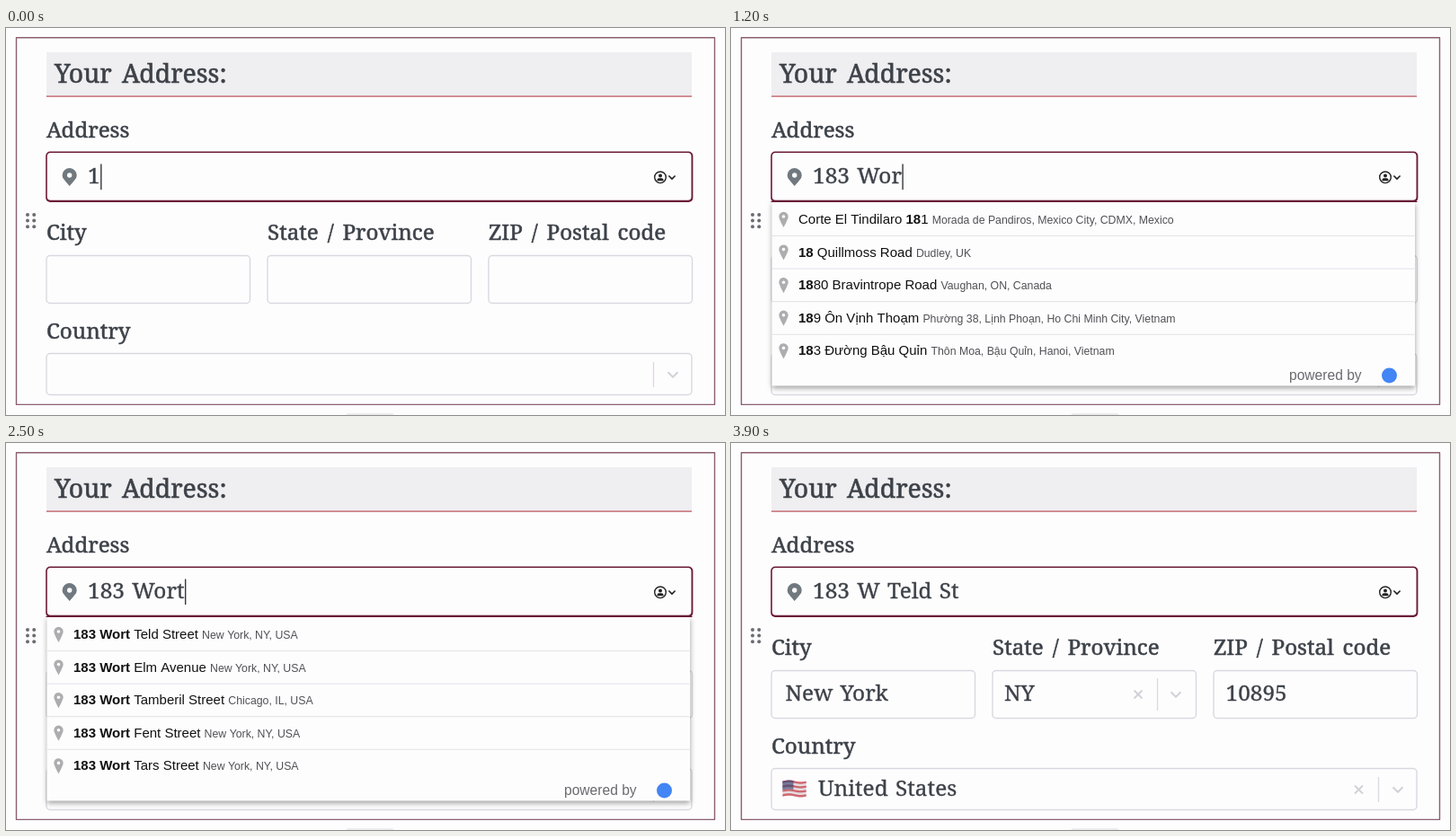
These frames come from a looping animation (800 px wide and 431 px high, 4300 ms). An HTML page with a canvas:

```html
<!DOCTYPE html>
<html lang="en">
<head>
<meta charset="utf-8">
<title>Address form</title>
<style>
  html, body { margin: 0; width: 100%; height: 100%; overflow: hidden; background: #fefdfe; }
  canvas { display: block; width: 100vw; height: 100vh; }
</style>
</head>
<body>
<canvas id="stage"></canvas>
<script>
const W = 800, H = 431, LOOP = 4300;
const canvas = document.getElementById('stage');
const ctx = canvas.getContext('2d');
const ratio = Math.max(1, window.devicePixelRatio || 1);
canvas.width = W * ratio;
canvas.height = H * ratio;

const SERIF = '"Noto Serif", "DejaVu Serif", serif';
const SANS = '"Liberation Sans", Arial, sans-serif';
const PAPER = '#fefdfe', INK = '#3d4249', WINE = '#6a1a36', PALE = '#d2d1d8', EDGE = '#d9d8df';

const STREET = '183 Wort Teld Street';
const US = 'New York, NY, USA';

// [start ms, text in the address field]
const typing = [
  [0, '1'], [200, '18'], [500, '183'], [800, '183 '], [1000, '183 W'],
  [1100, '183 Wo'], [1200, '183 Wor'], [1500, '183 Wort'],
  [2700, STREET + ', ' + US], [3400, '183 W Teld St']
];
const caretOff = [[2000, 2500], [3900, LOOP]];

const worldwide = [
  ['Corte El Tindilaro 181', 'Morada de Pandiros, Mexico City, CDMX, Mexico'],
  ['18 Quillmoss Road', 'Dudley, UK'],
  ['1880 Bravintrope Road', 'Vaughan, ON, Canada'],
  ['189 Ôn Vịnh Thoạm', 'Phường 38, Lịnh Phoạn, Ho Chi Minh City, Vietnam'],
  ['183 Đường Bậu Quỉn', 'Thôn Moa, Bậu Quỉn, Hanoi, Vietnam']
];
const nearby = [
  [STREET, US],
  ['183 Wort Elm Avenue', US],
  ['183 Wort Tamberil Street', 'Chicago, IL, USA'],
  ['183 Wort Fent Street', US],
  ['183 Wort Tars Street', US]
];

// Draws text on its baseline and returns the x where it ends.
function text(str, x, y, font, color) {
  ctx.font = font;
  ctx.fillStyle = color;
  ctx.fillText(str, x, y);
  return x + ctx.measureText(str).width;
}

// Serif text with a thin outline for a sturdier weight and roomier spaces.
function serif(str, x, y, size, weight, space) {
  ctx.wordSpacing = space + 'px';
  const end = text(str, x, y, size + 'px ' + SERIF, INK);
  ctx.strokeStyle = INK;
  ctx.lineWidth = weight;
  ctx.strokeText(str, x, y);
  ctx.wordSpacing = '0px';
  return end;
}

function label(str, x, y) {
  serif(str, x, y, 24.2, 0.55, 3.6);
}

function value(str, x, y) {
  return serif(str, x, y, 24.4, 0.35, 2);
}

function rect(x, y, w, h, color) {
  ctx.fillStyle = color;
  ctx.fillRect(x, y, w, h);
}

function dot(x, y, r, color) {
  ctx.fillStyle = color;
  ctx.beginPath();
  ctx.arc(x, y, r, 0, Math.PI * 2);
  ctx.fill();
}

function roundBox(x, y, w, h, r, color) {
  ctx.fillStyle = color;
  ctx.beginPath();
  ctx.roundRect(x, y, w, h, r);
  ctx.fill();
}

function line(points, color, width) {
  ctx.strokeStyle = color;
  ctx.lineWidth = width;
  ctx.beginPath();
  points.forEach(([x, y]) => ctx.lineTo(x, y));
  ctx.stroke();
}

function chevron(x, y, r, color, width) {
  line([[x - r, y - r / 2], [x, y + r / 2], [x + r, y - r / 2]], color, width);
}

function cross(x, y) {
  const r = 4.5;
  line([[x - r, y - r], [x + r, y + r]], PALE, 2);
  line([[x - r, y + r], [x + r, y - r]], PALE, 2);
}

// Teardrop marker: round head at (x, y), tip below.
function marker(x, y, r, tip, hole, color) {
  ctx.fillStyle = color;
  ctx.beginPath();
  ctx.arc(x, y, r, Math.PI * 0.88, Math.PI * 0.12);
  ctx.quadraticCurveTo(x + r * 0.6, y + tip * 0.55, x, y + tip);
  ctx.quadraticCurveTo(x - r * 0.6, y + tip * 0.55, x - r * 0.93, y + r * 0.37);
  ctx.fill();
  dot(x, y, hole, PAPER);
}

function field(x, y, w, h) {
  roundBox(x, y, w, h, 4, PAPER);
  ctx.strokeStyle = EDGE;
  ctx.lineWidth = 1.4;
  ctx.stroke();
}

function flag(x, y) {
  const w = 26, h = 17, sway = i => Math.sin(i / w * Math.PI * 2) * 0.9;
  for (let i = 0; i < w; i++) {
    const top = y - sway(i);
    for (let s = 0; s < 7; s++) {
      rect(x + i, top + s * h / 7, 1.1, h / 7, s % 2 ? '#dfd3d7' : '#c2434d');
    }
    if (i < 12) rect(x + i, top, 1.1, h * 4 / 7, '#3b4a78');
  }
}

function frameAndHeader() {
  rect(0, 0, W, H, PAPER);
  ctx.strokeStyle = '#8c5f70';
  ctx.lineWidth = 1.4;
  ctx.strokeRect(11.5, 10.8, 777, 408.6);
  roundBox(378, 429, 54, 6, 3, '#ececef');

  rect(45, 27, 718, 48.4, '#efeef0');
  rect(45, 75.3, 718, 1.6, '#c8757d');
  serif('Your Address:', 54, 61, 28.4, 0.6, 4);

  for (let i = 0; i < 6; i++) {
    dot(24 + (i % 2) * 7.2, 208 + Math.floor(i / 2) * 6.6, 2, '#6c6c72');
  }
}

function form(filled) {
  label('Address', 45, 121.5);
  label('City', 45, 235.5);
  label('State / Province', 291, 235.5);
  label('ZIP / Postal code', 537, 235.5);
  label('Country', 45, 345.5);

  [45, 291, 537].forEach(x => field(x, 253.5, 226.5, 53));
  field(45, 362.5, 718, 46);
  line([[720.5, 372], [720.5, 400]], EDGE, 1.3);
  chevron(742, 386, 5.5, PALE, 2);

  if (!filled) return;
  value('New York', 60.5, 287);
  value('NY', 304, 287);
  value('10895', 550.5, 287);
  value('United States', 97, 393);
  cross(453, 280);
  line([[474.5, 262], [474.5, 298]], EDGE, 1.3);
  chevron(495, 280, 5.5, PALE, 2);
  cross(698.5, 386);
  flag(57.5, 376.5);
}

function addressField(str, caret) {
  roundBox(44.2, 137.5, 720.2, 56.5, 5, WINE);
  roundBox(45.8, 139, 716.7, 52.8, 3.8, PAPER);

  marker(70.7, 164, 8, 12, 2.7, '#70797f');

  ctx.strokeStyle = '#222';
  ctx.lineWidth = 1.4;
  ctx.beginPath();
  ctx.arc(728, 166.3, 6.3, 0, Math.PI * 2);
  ctx.stroke();
  dot(728, 164.4, 2, '#222');
  roundBox(724.5, 167.3, 7, 3, [2, 2, 0, 0], '#222');
  chevron(741, 166.3, 3.6, '#222', 1.6);

  const end = value(str, 91, 173);
  if (caret) rect(end + 0.5, 151.5, 1.4, 28.5, '#34373c');
}

// Main text with the matched part in bold, then the place in small grey.
function suggestion([main, place], match, y) {
  const at = main.indexOf(match), stop = at + match.length;
  let x = text(main.slice(0, at), 75, y, '15px ' + SANS, '#111');
  x = text(main.slice(at, stop), x, y, 'bold 15px ' + SANS, '#111');
  x = text(main.slice(stop) + ' ', x, y, '15px ' + SANS, '#111');
  text(place, x, y, '12.3px ' + SANS, '#505054');
}

function dropdown(rows, match, picked) {
  ctx.save();
  ctx.shadowColor = 'rgba(0,0,0,.38)';
  ctx.shadowBlur = 6 * ratio;
  ctx.shadowOffsetY = 2 * ratio;
  rect(45.5, 194, 715.5, 204.5, PAPER);
  ctx.restore();
  rect(44.5, 192.8, 719, 1.2, WINE);

  if (picked) rect(46, 195, 714.5, 36.5, '#e8ecf8');
  rows.forEach((row, i) => {
    const mid = 213 + i * 36.6;
    marker(58.5, mid - 3, 5.2, 12, 1.8, picked && i === 0 ? '#e2494f' : '#adadb0');
    suggestion(row, match, mid + 5);
    if (i < 4) rect(46, mid + 18, 714.5, 1, '#e2e2e6');
  });

  text('powered by', 621, 392, '15.6px ' + SANS, '#6a6a6e');
  dot(732.5, 387, 8.5, '#4285f4');
}

function draw(t) {
  ctx.setTransform(canvas.width / W, 0, 0, canvas.height / H, 0, 0);
  ctx.lineJoin = 'round';
  const typed = typing.filter(([start]) => start <= t).pop()[1];
  const caret = !caretOff.some(([from, to]) => t >= from && t < to);

  frameAndHeader();
  form(t >= 3400);
  addressField(typed, caret);
  if (t >= 500 && t < 1500) dropdown(worldwide, '18', false);
  else if (t >= 1500 && t < 3400) dropdown(nearby, t < 1700 ? '183 Wo' : '183 Wort', t >= 2700);
}

const begin = performance.now();
function tick() {
  draw((performance.now() - begin) % LOOP);
  requestAnimationFrame(tick);
}
tick();
</script>
</body>
</html>
```
